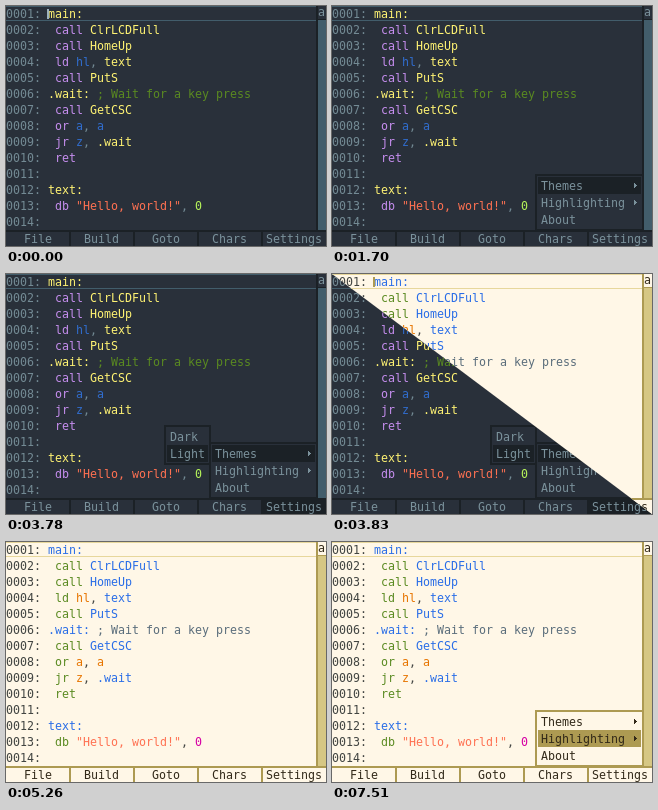
Write an HTML page that moves like this. It is 320 by 240 pixels and loops after 8000 ms.

```html
<!DOCTYPE html>
<html lang="en">
<head>
<meta charset="utf-8">
<title>Assembly editor</title>
<style>
html, body { margin: 0; width: 100%; height: 100%; overflow: hidden; background: #29303a; }
svg { display: block; width: 320px; height: 240px; }
text { font: 11.63px "DejaVu Sans Mono", monospace; white-space: pre; }
</style>
</head>
<body>
<svg id="stage" viewBox="0 0 320 240" shape-rendering="crispEdges"></svg>
<script>
const LOOP = 8000, PITCH = 7, ROW = 16;

const themes = {
  dark: {
    bg: '#29303a', bar: '#29303a', edge: '#1b2126', track: '#425d6b', line: '#425d6b',
    menu: '#29303a', select: '#1b2126', press: '#1b2126',
    ui: '#7b929c', gutter: '#738a94', plain: '#738a94', label: '#fff373', op: '#c68eef',
    reg: '#316dce', note: '#5a8a21', str: '#ff7152', num: '#b5f35a', cursor: '#9cb2bd'
  },
  light: {
    bg: '#fff7e7', bar: '#fff7e7', edge: '#ad9a52', track: '#d6c784', line: '#e7d79c',
    menu: '#fff7e7', select: '#ad9a52', press: '#d6c784',
    ui: '#312818', gutter: '#424542', plain: '#424542', label: '#296de7', op: '#5a8a21',
    reg: '#e77500', note: '#5a6d7b', str: '#ff7152', num: '#d600a5', cursor: '#ad9a52'
  }
};

// Each line: column, then pairs of colour role and text.
const code = [
  [0, 'label', 'main:'],
  [1, 'op', 'call ', 'label', 'ClrLCDFull'],
  [1, 'op', 'call ', 'label', 'HomeUp'],
  [1, 'op', 'ld ', 'reg', 'hl', 'plain', ', ', 'label', 'text'],
  [1, 'op', 'call ', 'label', 'PutS'],
  [0, 'label', '.wait:', 'note', ' ; Wait for a key press'],
  [1, 'op', 'call ', 'label', 'GetCSC'],
  [1, 'op', 'or ', 'reg', 'a', 'plain', ', ', 'reg', 'a'],
  [1, 'op', 'jr ', 'reg', 'z', 'plain', ', ', 'label', '.wait'],
  [1, 'op', 'ret'],
  [0],
  [0, 'label', 'text:'],
  [1, 'op', 'db ', 'str', '"Hello, world!"', 'plain', ', ', 'num', '0'],
  [0]
];
const buttons = ['File', 'Build', 'Goto', 'Chars', 'Settings'];

const rect = (x, y, w, h, fill) =>
  `<rect x="${x}" y="${y}" width="${w}" height="${h}" fill="${fill}"/>`;
const text = (x, y, str, fill) => `<text x="${x}" y="${y}" fill="${fill}">${str}</text>`;

function codeLine(line, i, c) {
  const y = i * ROW + 12;
  let out = text(0, y, String(i + 1).padStart(4, '0') + ':', c.gutter);
  let col = 6 + line[0];
  for (let k = 1; k < line.length; k += 2) {
    out += text(col * PITCH, y, line[k + 1], c[line[k]]);
    col += line[k + 1].length;
  }
  return out;
}

function button(label, i, c, pressed) {
  const x = i * 64;
  const fill = pressed && i === 4 ? c.press : c.bar;
  return rect(x, 226, 64, 14, fill) + (i ? rect(x - 1, 226, 2, 14, c.edge) : '') +
    text(Math.floor(x + 32 - label.length * PITCH / 2), 237, label, c.ui);
}

function menu(x, y, w, items, selected, arrows, c) {
  const h = items.length * 17 + 6;
  let out = rect(x, y, w, h, c.edge) + rect(x + 2, y + 2, w - 4, h - 4, c.menu);
  items.forEach((item, i) => {
    const top = y + 3 + i * 17;
    if (i === selected) out += rect(x + 3, top, w - 6, 17, c.select);
    out += text(x + 6, top + 13, item, c.ui);
    if (i < arrows) out += `<path d="M${x + w - 10} ${top + 6}l3 2.5-3 2.5z" fill="${c.ui}"/>`;
  });
  return out;
}

function scene([, theme, cursor, pressed, main, sub]) {
  const c = themes[theme];
  let out = rect(0, 0, 320, 240, c.bg) +
    rect(0, 0, 310, 1, c.line) + rect(0, 14, 310, 1, c.line) +
    code.map((line, i) => codeLine(line, i, c)).join('') +
    rect(310, 0, 2, 224, c.edge) + rect(312, 0, 8, 224, c.track) +
    rect(312, 0, 8, 13, c.bg) + rect(312, 13, 8, 1, c.edge) + text(312, 10, 'a', c.ui) +
    rect(0, 224, 320, 2, c.edge) +
    buttons.map((label, i) => button(label, i, c, pressed)).join('');
  if (cursor) out += rect(41, 3, 2, 10, c.cursor);
  if (main >= 0) out += menu(203, 168, 109, ['Themes', 'Highlighting', 'About'], main, 2, c);
  if (sub >= 0) out += menu(158, 151, 47, ['Dark', 'Light'], sub, 0, c);
  return out;
}

// time, theme, cursor, Settings pressed, menu row, submenu row, torn refresh
const steps = [
  [0, 'dark', 1, 0, -1, -1],
  [90, 'dark', 0, 0, -1, -1],
  [430, 'dark', 1, 0, -1, -1],
  [770, 'dark', 0, 0, -1, -1],
  [1120, 'dark', 1, 0, -1, -1],
  [1460, 'dark', 0, 0, -1, -1],
  [1600, 'dark', 0, 1, -1, -1],
  [1650, 'dark', 0, 1, -1, -1, 1],
  [1700, 'dark', 0, 0, 0, -1],
  [2440, 'dark', 0, 0, 0, 0],
  [2980, 'dark', 0, 0, 0, 1],
  [3780, 'dark', 0, 1, 0, 1],
  [3830, 'dark', 0, 1, 0, 1, 1],
  [3880, 'light', 1, 0, -1, -1],
  [4570, 'light', 0, 0, -1, -1],
  [4910, 'light', 1, 0, -1, -1],
  [5260, 'light', 0, 0, -1, -1],
  [5600, 'light', 1, 0, -1, -1],
  [5940, 'light', 0, 0, -1, -1],
  [6280, 'light', 1, 0, -1, -1],
  [6630, 'light', 0, 0, -1, -1],
  [6830, 'light', 0, 1, -1, -1],
  [6920, 'light', 0, 1, -1, -1, 1],
  [6970, 'light', 0, 0, 0, -1],
  [7510, 'light', 0, 0, 1, -1]
];

// A torn refresh shows the next step above the screen diagonal.
const views = steps.map((step, i) => step[6]
  ? scene(step) + '<clipPath id="tear"><path d="M0 0H320V240z"/></clipPath>' +
    `<g clip-path="url(#tear)">${scene(steps[i + 1])}</g>`
  : scene(step));

const stage = document.getElementById('stage');
const start = performance.now();
let shown = -1;

function draw(now) {
  const t = Math.max(0, now - start) % LOOP;
  const i = steps.findLastIndex(step => step[0] <= t);
  if (i !== shown) stage.innerHTML = views[shown = i];
  requestAnimationFrame(draw);
}
draw(start);
</script>
</body>
</html>
```
